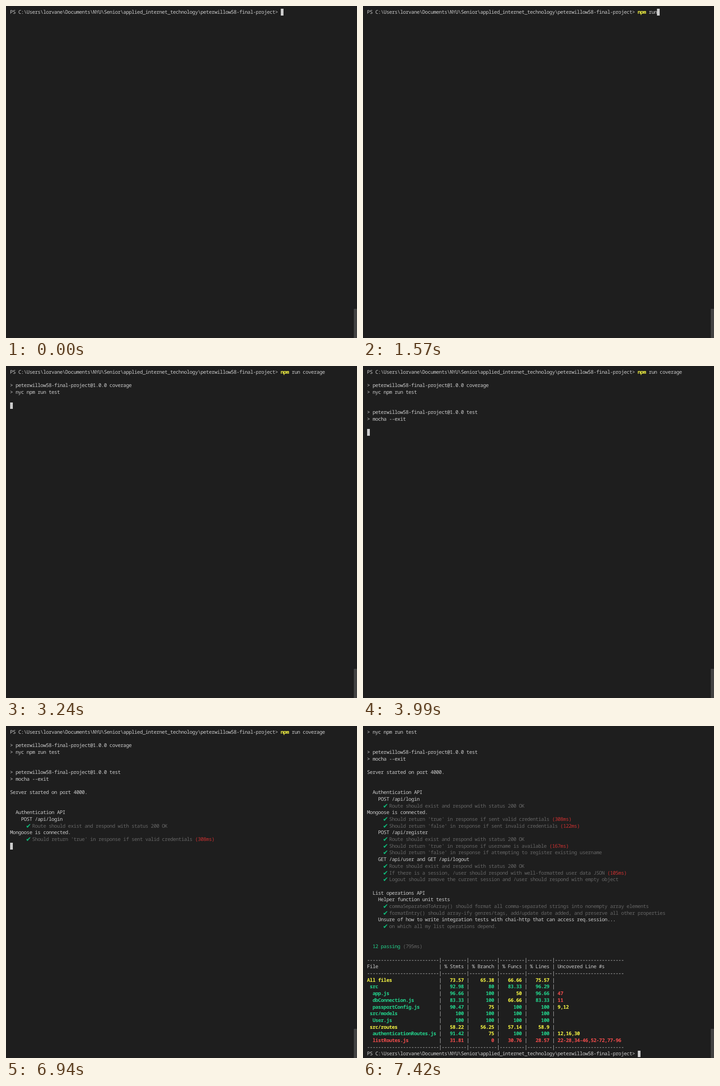
Recreate the animation shown at these times as an HTML page. Size 769 px wide and 728 px high, loop 8000 ms.

```html
<!DOCTYPE html>
<html lang="en">
<head>
<meta charset="utf-8">
<title>Terminal</title>
<style>
html, body { margin: 0; width: 100%; height: 100%; overflow: hidden; background: #1e1e1e; }
#stage { position: relative; width: 100%; height: 100%; overflow: hidden; contain: strict; }
#term {
  position: absolute; left: 8.8px; top: 6.1px;
  font: 500 11px "Noto Sans Mono", "DejaVu Sans Mono", monospace;
  color: #ccc; white-space: pre;
  text-rendering: geometricPrecision;
  font-variant-ligatures: none;
}
.row, #cursor { position: absolute; left: 0; height: 14.7px; line-height: 14.7px; }
.row { margin-top: .8px; }
#cursor { width: 6.05px; background: #ccc; }
#bar { position: absolute; right: 0; bottom: 0; width: 7px; height: 64px; background: #424242; }
b { font-weight: 700; }
.high { color: #23d18b; }
.mid { color: #f5f543; }
.low { color: #f14c4c; }
.dim { color: #666; }
.slow { color: #cd3131; }
.tick { position: absolute; margin-left: -1.7px; color: #0dbc79; font: 14px/14.7px "DejaVu Sans", sans-serif; }
</style>
</head>
<body>
<div id="stage">
  <div id="term"><div id="cursor"></div></div>
  <div id="bar"></div>
</div>
<script>
const CELL = 6.05, ROW = 14.7, LOOP = 8000;
const PROJECT = 'peterwillow58-final-project';
const PROMPT = `PS C:\\Users\\lorvane\\Documents\\NYU\\Senior\\applied_internet_technology\\${PROJECT}> `;
const COMMAND = 'npm run coverage';

const term = document.getElementById('term');
const cursor = document.getElementById('cursor');

const paint = (cls, text, tag = 'span') => `<${tag} class="${cls}">${text}</${tag}>`;
const pass = (text, ms) =>
  '      ' + paint('tick', '✔') + '  ' + paint('dim', text) + (ms ? paint('slow', ` (${ms}ms)`) : '');

// Coverage table
const WIDTHS = [26, 9, 10, 9, 9, 25];
const rule = WIDTHS.map(w => '-'.repeat(w)).join('|');
const level = v => v < 50 ? 'low' : v < 80 ? 'mid' : 'high';
const number = (v, i) => paint(level(v), String(v).padStart(WIDTHS[i + 1] - 1) + ' ', 'b');

function coverage(name, stmts, branch, funcs, lines, missed = '') {
  return [
    paint(level(stmts), name.padEnd(WIDTHS[0]), 'b'),
    ...[stmts, branch, funcs, lines].map(number),
    paint(lines === 100 ? 'mid' : 'low', ' ' + missed, 'b')
  ].join('|');
}

const lines = [
  PROMPT + '<b class="mid" id="verb"></b><span id="args"></span>',
  '',
  `> ${PROJECT}@1.0.0 coverage`,
  '> nyc npm run test',
  '', '',
  `> ${PROJECT}@1.0.0 test`,
  '> mocha --exit',
  '',
  'Server started on port 4000.',
  '', '',
  '  Authentication API',
  '    POST /api/login',
  pass('Route should exist and respond with status 200 OK'),
  'Mongoose is connected.',
  pass("Should return 'true' in response if sent valid credentials", 308),
  pass("Should return 'false' in response if sent invalid credentials", 122),
  '    POST /api/register',
  pass('Route should exist and respond with status 200 OK'),
  pass("Should return 'true' in response if username is available", 167),
  pass("Should return 'false' in response if attempting to register existing username"),
  '    GET /api/user and GET /api/logout',
  pass('Route should exist and respond with status 200 OK'),
  pass('If there is a session, /user should respond with well-formatted user data JSON', 105),
  pass('Logout should remove the current session and /user should respond with empty object'),
  '',
  '  List operations API',
  '    Helper function unit tests',
  pass('commaSeparatedToArray() should format all comma-separated strings into nonempty array elements'),
  pass('formatEntry() should array-ify genres/tags, add/update date added, and preserve all other properties'),
  '    Unsure of how to write integration tests with chai-http that can access req.session...',
  pass('on which all my list operations depend.'),
  '', '',
  '  ' + paint('high', '12 passing') + paint('dim', ' (795ms)'),
  '',
  rule,
  'File'.padEnd(26) + '| % Stmts | % Branch | % Funcs | % Lines | Uncovered Line #s',
  rule,
  coverage('All files', 73.57, 65.38, 66.66, 75.57),
  coverage(' src', 92.98, 80, 83.33, 96.29),
  coverage('  app.js', 96.66, 100, 50, 96.66, '47'),
  coverage('  dbConnection.js', 83.33, 100, 66.66, 83.33, '11'),
  coverage('  passportConfig.js', 90.47, 75, 100, 100, '9,12'),
  coverage(' src/models', 100, 100, 100, 100),
  coverage('  User.js', 100, 100, 100, 100),
  coverage(' src/routes', 58.22, 56.25, 57.14, 58.9),
  coverage('  authenticationRoutes.js', 91.42, 75, 100, 100, '12,16,30'),
  coverage('  listRoutes.js', 31.81, 0, 30.76, 28.57, '22-28,34-46,52-72,77-96'),
  rule,
  PROMPT
];

const rows = lines.map(html => {
  const row = document.createElement('div');
  row.className = 'row';
  row.innerHTML = html;
  term.insertBefore(row, cursor);
  return row;
});
const verb = document.getElementById('verb');
const args = document.getElementById('args');

// Fit the font's advance to the terminal cell
const advance = rows[0].getBoundingClientRect().width / PROMPT.length;
term.style.letterSpacing = CELL - advance + 'px';

// [time, characters typed, cursor hidden]
const typing = [
  [0, 0], [1030, 1], [1150, 2], [1270, 3], [1420, 5], [1570, 7], [1700, 8], [1820, 9, true],
  [1970, 10], [2090, 12], [2210, 13, true], [2360, 15], [2480, 16]
];
// [time, rows printed]
const output = [
  [0, 0], [2990, 1], [3240, 5], [3990, 9], [6550, 10], [6700, 14], [6820, 16],
  [6940, 17], [7060, 20], [7180, 22], [7300, 25], [7420, 51]
];
const latest = (steps, t) => steps.findLast(step => step[0] <= t);

function render(t) {
  const [, typed, hidden] = latest(typing, t);
  const [, printed] = latest(output, t);
  const done = printed === rows.length - 1;
  const scroll = done ? 3 : 0;
  const text = COMMAND.slice(0, typed);

  verb.textContent = text.slice(0, 3);
  args.textContent = text.slice(3);
  rows.forEach((row, i) => {
    const shown = i >= scroll && (i === 0 || i < printed || done);
    row.style.display = shown ? 'block' : 'none';
    row.style.top = (i - scroll) * ROW + 'px';
  });

  const column = printed === 0 ? PROMPT.length + typed : done ? PROMPT.length : 0;
  cursor.style.left = column * CELL + 'px';
  cursor.style.top = (printed - scroll) * ROW + 'px';
  cursor.style.visibility = hidden ? 'hidden' : 'visible';
}

const start = performance.now();
function tick() {
  render((performance.now() - start) % LOOP);
  requestAnimationFrame(tick);
}
tick();
</script>
</body>
</html>
```
